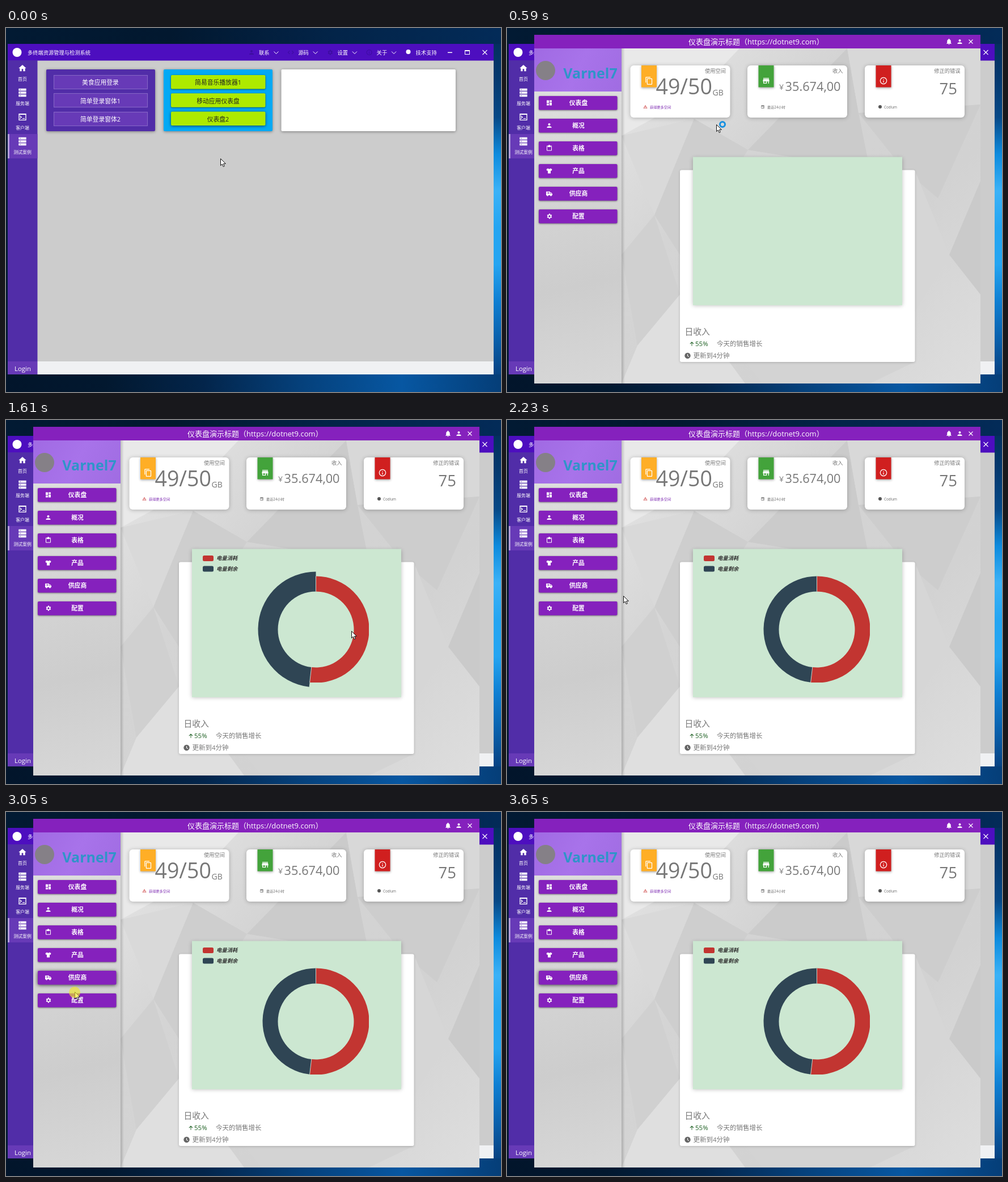
Recreate the animation shown at these times as an HTML page with a canvas. Size 873x642 px, loop 3850 ms.

```html
<!DOCTYPE html>
<html lang="zh-CN">
<head>
<meta charset="utf-8">
<title>仪表盘</title>
<style>
  html, body { margin: 0; width: 100%; height: 100%; overflow: hidden; background: #021a35; }
  canvas { display: block; }
</style>
</head>
<body>
<canvas id="stage" width="873" height="642"></canvas>
<script>
const g = document.getElementById('stage').getContext('2d');
const LOOP = 3850;
const FONT = '"Open Sans", "Noto Sans CJK SC", "Noto Sans CJK", sans-serif';

const ICONS = {
  home: 'M10 20v-6h4v6h5v-8h3L12 3 2 12h3v8z',
  server: 'M2 1h20v6H2zM2 9h20v6H2zM2 17h20v6H2zM5 3h2v2H5zM5 11h2v2H5zM5 19h2v2H5z',
  terminal: 'M2 3h20v18H2zM4 6h16v13H4zM6 8l4.5 4.5L6 17l-1.4-1.4 3.1-3.1-3.1-3.1zM12 15h6v2h-6z',
  person: 'M12 4a4 4 0 1 0 .01 0zM4 20v-2c0-5 16-5 16 0v2z',
  code: 'M9 17l-5-5 5-5-1.5-1.5L1 12l6.5 6.5zM15 17l5-5-5-5 1.5-1.5L23 12l-6.5 6.5z',
  gear: 'M19.4 13v-2l2.1-1.6-2-3.5-2.5 1-1.7-1L14.9 3h-4l-.4 2.9-1.7 1-2.5-1-2 3.5L6.4 11v2l-2.1 1.6 2 3.5 2.5-1 1.7 1 .4 2.9h4l.4-2.9 1.7-1 2.5 1 2-3.5zM12.9 8.5a3.5 3.5 0 1 0 .01 0z',
  info: 'M11 7h2v2h-2zM11 11h2v6h-2zM12 2a10 10 0 1 0 .01 0zM12 4a8 8 0 1 1-.01 0z',
  bell: 'M12 22a2 2 0 0 0 2-2h-4a2 2 0 0 0 2 2zM18 16v-5c0-3-1.6-5.6-4.5-6.3V4a1.5 1.5 0 0 0-3 0v.7C7.6 5.4 6 8 6 11v5l-2 2v1h16v-1z',
  board: 'M3 13h8V3H3zM3 21h8v-6H3zM13 21h8V11h-8zM13 3v6h8V3z',
  clipboard: 'M19 3h-4a3 3 0 0 0-6 0H5a2 2 0 0 0-2 2v14a2 2 0 0 0 2 2h14a2 2 0 0 0 2-2V5a2 2 0 0 0-2-2zM5 5h2v3h10V5h2v14H5z',
  shirt: 'M16 3l6 3-2 6-3-1v10H7V11l-3 1-2-6 6-3c1 3 7 3 8 0z',
  truck: 'M1 5h14v3h4l4 5v5h-2a3 3 0 0 1-6 0H9a3 3 0 0 1-6 0H1zM16 10v3h4l-2-3zM4 9v2h5v2l4-3-4-3v2z',
  copy: 'M16 1H4a2 2 0 0 0-2 2v14h2V3h12zM19 5H8a2 2 0 0 0-2 2v14a2 2 0 0 0 2 2h11a2 2 0 0 0 2-2V7a2 2 0 0 0-2-2zM19 21H8V7h11z',
  store: 'M20 4H4v2h16zM21 14v-2l-1-5H4l-1 5v2h1v6h10v-6h4v6h2v-6zM12 18H6v-4h6z',
  warning: 'M1 21h22L12 2zM12 6l7.5 13h-15zM11 10h2v5h-2zM11 16h2v2h-2z',
  calendar: 'M3 3h18v18H3zM5 9h14v10H5zM13 13h4v4h-4z',
  clock: 'M12 2a10 10 0 1 0 .01 0zM11 6h2v6l4 3-1 1.5-5-3.5z',
  up: 'M11 20V8l-5 5-1.5-1.5L12 4l7.5 7.5L18 13l-5-5v12z',
  arrow: 'M.5 .5V12.6L3.3 10 5.2 14.6 7.3 13.7 5.4 9.3H9.4z',
  hand: 'M3 1.5a1.3 1.3 0 0 1 2.6 0V7c2 0 6.9.5 6.9 3 0 2.5-1 4-1.5 6.5H4.5C4 14-.5 10.500 .2 9.500 1 8.500 2 9.300 3 10.500z'
};

// Pointer steps: start time, position, and what surrounds it.
const STEPS = [
  { t: 0, x: 378, y: 230 },
  { t: 200, x: 357, y: 169, shape: 'hand', fill: 9 },
  { t: 390, x: 357, y: 152, shape: 'hand', fill: 34, halo: [360, 153] },
  { t: 590, x: 369, y: 170, busy: true },
  { t: 810, x: 429, y: 263 },
  { t: 1010, x: 427, y: 335 },
  { t: 1210, x: 397, y: 362 },
  { t: 1410, x: 606, y: 375, grow: 2 },
  { t: 1610, x: 609, y: 372, grow: 8 },
  { t: 1810, x: 593, y: 370 },
  { t: 2030, x: 570, y: 365 },
  { t: 2230, x: 205, y: 310 },
  { t: 2430, x: 122, y: 293, hover: 4 },
  { t: 2630, x: 125, y: 207, hover: 2 },
  { t: 2850, x: 121, y: 232, hover: 4, halo: [121, 232] },
  { t: 3050, x: 121, y: 317, hover: 4, halo: [121, 318] },
  { t: 3250, x: 802, y: 580, hover: 4 },
  { t: 3450, hidden: true, hover: 4 }
];

function gradient(x1, y1, x2, y2, ...colors) {
  const fill = g.createLinearGradient(x1, y1, x2, y2);
  colors.forEach((c, i) => fill.addColorStop(i / (colors.length - 1), c));
  return fill;
}

function box(x, y, w, h, fill, { r = 0, shadow = 0, dark = .4 } = {}) {
  g.save();
  if (shadow) {
    g.shadowColor = `rgba(0,0,0,${dark})`;
    g.shadowBlur = shadow;
    g.shadowOffsetY = shadow > 3 ? 1 : .7;
  }
  g.fillStyle = fill;
  g.beginPath();
  g.roundRect(x, y, w, h, r);
  g.fill();
  g.restore();
}

// y is the visual middle of the line.
function text(str, x, y, size, color, align = 'left', style = '') {
  g.font = `${style} ${size}px ${FONT}`;
  g.fillStyle = color;
  g.textAlign = align;
  g.fillText(str, x, y + size * .37);
}

function line(points, color, width = 1) {
  g.strokeStyle = color;
  g.lineWidth = width;
  g.beginPath();
  points.forEach(([x, y]) => g.lineTo(x, y));
  g.stroke();
}

function poly(fill, ...points) {
  g.fillStyle = fill;
  g.beginPath();
  points.forEach(([x, y]) => g.lineTo(x, y));
  g.fill();
}

function disc(x, y, r, fill) {
  g.fillStyle = fill;
  g.beginPath();
  g.arc(x, y, r, 0, 7);
  g.fill();
}

function icon(name, x, y, size, color) {
  g.save();
  g.translate(x - size / 2, y - size / 2);
  g.scale(size / 24, size / 24);
  g.fillStyle = color;
  g.fill(new Path2D(ICONS[name]), 'evenodd');
  g.restore();
}

function cross(x, y, r) {
  line([[x - r, y - r], [x + r, y + r]], '#fff', 1.1);
  line([[x - r, y + r], [x + r, y - r]], '#fff', 1.1);
}

function desktop() {
  box(0, 0, 873, 642, gradient(0, 0, 873, 0, '#021a33', '#02182f', '#032449', '#032b58'));
  box(860, 28, 13, 583, gradient(0, 28, 0, 611,
    '#03305f', '#053a70', '#064987', '#0e8bdd', '#3bb2f7', '#25a5f1', '#25a5f1', '#0f7fd2', '#0961ad', '#074383'));
  box(0, 611, 873, 31, gradient(0, 0, 873, 0, '#02152b', '#02182f', '#03254b', '#05417c', '#0757a2', '#053e78'));
}

function mainWindow(fill = 0) {
  box(3, 28, 857, 583, '#ccc');
  box(3, 28, 857, 29.500, '#4d0ebf');
  box(3, 57, 52.500, 531, '#512da8');
  box(55, 588, 805, 23, '#f0f1f3');
  box(3, 588, 52.500, 23, '#673ab7');
  text('Login', 29.500, 601, 11.500, '#fff', 'center');

  disc(19.500, 43, 8, '#fff');
  text('多终端资源管理与检测系统', 38, 43.500, 9.250, '#fff');
  [['联系', 'person'], ['源码', 'code'], ['设置', 'gear'], ['关于', 'info']].forEach(([label, name], i) => {
    const x = 446 + i * 69.200;
    icon(name, x - 13, 43, 12, '#3d0da0');
    text(label, x, 43.500, 9.350, '#fff');
    line([[x + 26.500, 41.500], [x + 30.500, 45.500], [x + 34.500, 41.500]], '#fff');
  });
  disc(709.500, 42, 4, '#fff');
  text('技术支持', 722.500, 43.500, 9.350, '#fff');
  box(779, 42.500, 8, 1.500, '#fff');
  box(809, 39, 9, 2, '#fff');
  g.strokeStyle = '#fff';
  g.lineWidth = 1;
  g.strokeRect(809.500, 39.500, 8, 7);
  cross(844.500, 43, 4);

  box(3, 187, 52.500, 43, '#673ab7');
  box(3, 187, 3, 43, '#b39ddb');
  [['首页', 'home'], ['服务端', 'server'], ['客户端', 'terminal'], ['测试案例', 'server']].forEach(([label, name], i) => {
    icon(name, 29, 71 + i * 43, 16, '#fff');
    text(label, 29, 90 + i * 43, 7.900, '#fff', 'center');
  });

  box(71, 73, 192, 109, '#512da8', { r: 2, shadow: 5 });
  box(278, 73, 192, 109, '#03a9f4', { r: 2, shadow: 5 });
  box(485.500, 73, 307.500, 109, '#fff', { r: 2, shadow: 5 });
  ['美食应用登录', '简单登录窗体1', '简单登录窗体2'].forEach((label, i) => {
    const y = 83 + i * 32.300;
    box(84, y, 166, 25, '#673ab7');
    box(84, y, fill, 25, '#a184d4');
    g.strokeStyle = '#8564c6';
    g.strokeRect(84.500, Math.round(y) + .5, 165, 24);
    text(label, 166.500, y + 13.500, 10.800, '#fff', 'center');
  });
  ['简易音乐播放器1', '移动应用仪表盘', '仪表盘2'].forEach((label, i) => {
    const y = 83 + i * 32.300;
    box(291, y, 166.500, 24.500, '#aeea00', { r: 2, shadow: i === 2 ? 5 : 3, dark: .6 });
    text(label, 374, y + 13.500, 10.800, '#222', 'center');
  });
}

function backdrop() {
  box(48, 12, 787, 615, gradient(202, 36, 835, 627, '#e6e6e6', '#d4d4d4', '#d2d2d2', '#dedede'));
  poly('#e9e9e9', [202, 36], [410, 36], [330, 120], [202, 190]);
  poly('#cbcbcb', [600, 36], [425, 215], [640, 250], [620, 150]);
  poly('#d8d8d8', [600, 36], [835, 36], [835, 135], [620, 150]);
  poly('#cdcdcd', [620, 150], [835, 135], [760, 300], [700, 250]);
  poly('#d9d9d9', [202, 190], [330, 160], [260, 330]);
  poly('#cecece', [260, 330], [330, 160], [425, 215], [305, 400]);
  poly('#d0d0d0', [202, 400], [260, 330], [305, 470], [230, 560]);
  poly('#d6d6d6', [719, 250], [780, 400], [719, 500]);
  poly('#cacaca', [780, 400], [835, 270], [835, 470]);
  poly('#dfdfdf', [230, 560], [305, 470], [420, 627], [202, 627]);
  poly('#d3d3d3', [420, 589], [719, 589], [640, 627], [450, 627]);
}

function statCard(x, color, name, label) {
  box(x, 66, 176, 92, '#fff', { r: 6, shadow: 7, dark: .25 });
  box(x + 19.500, 66, 27, 38.500, color, { shadow: 4, dark: .35 });
  icon(name, x + 33, 93, 15, '#fff');
  text(label, x + 168.500, 75.500, 9.250, '#777', 'right');
}

function slice(from, to, outer, color) {
  const cx = 546.500, cy = 369.500;
  g.fillStyle = color;
  g.beginPath();
  g.arc(cx, cy, outer, from, to);
  g.arc(cx, cy, 67, to, from, true);
  g.fill();
}

function chart(grow = 0) {
  [['电量消耗', '#c23531'], ['电量剩余', '#2f4554']].forEach(([label, color], i) => {
    const y = 244 + i * 18.500;
    box(347, y - 5, 19, 10, color, { r: 2.500 });
    text(label, 371, y, 9.350, '#333', 'left', 'italic bold');
  });
  const top = -Math.PI / 2, split = top + Math.PI * 1.037;
  g.save();
  g.beginPath();
  g.rect(328, 228, 312, 235);
  g.clip();
  slice(top, split, 94, '#c23531');
  g.restore();
  slice(split, top + Math.PI * 2, 94 + grow, '#2f4554');
  [top, split].forEach(a => {
    const at = r => [546.500 + r * Math.cos(a), 369.500 + r * Math.sin(a)];
    line([at(67), at(94)], '#dcebdf', .8);
  });
}

function dashboard({ t, hover, grow }) {
  backdrop();
  box(202, 36, 6, 591, gradient(202, 0, 208, 0, 'rgba(0,0,0,.18)', 'rgba(0,0,0,0)'));
  box(48, 36, 154, 591, gradient(48, 112, 160, 627, '#dedede', '#d5d5d5', '#cdcdcd', '#d7d7d7'));
  box(48, 36, 154, 76, gradient(48, 36, 202, 112, '#a06ae3', '#a873ea', '#a06ce2'));
  box(48, 12, 787, 24, '#8521bd');
  text('仪表盘演示标题（https://dotnet9.com）', 320, 24, 13, '#fff');
  icon('bell', 779.500, 24, 13, '#fff');
  icon('person', 798.500, 24, 12, '#fff');
  cross(818, 24, 3.500);

  disc(68, 75, 17, '#858087');
  text('Varnel7', 147, 79.500, 25, '#2f94c9', 'center', 'bold');

  [['仪表盘', 'board'], ['概况', 'person'], ['表格', 'clipboard'],
   ['产品', 'shirt'], ['供应商', 'truck'], ['配置', 'gear']].forEach(([label, name], i) => {
    const y = 120 + i * 40, active = hover === i;
    box(56, y, 138.500, 24.500, '#8521bd', { r: 2, shadow: active ? 6 : 3, dark: active ? .7 : .5 });
    icon(name, 74.500, y + 12, 12, '#fff');
    text(label, 126, y + 11.700, 10.800, '#fff', 'center', 'bold');
  });

  statCard(217.500, '#ffae26', 'copy', '使用空间');
  text('49/50', 362, 103, 37.500, '#777', 'right');
  text('GB', 362.500, 113.500, 14, '#777');
  icon('warning', 244, 139, 7.500, '#c62828');
  text('获得更多空间', 252, 139.500, 6.200, '#7b27b0');

  statCard(424, '#43a33b', 'store', '收入');
  text('￥', 478, 105, 12, '#777');
  text('35.674,00', 588.500, 102.500, 21.700, '#777', 'right');
  icon('calendar', 451, 139, 7, '#666');
  text('最近24小时', 459, 139.500, 6.200, '#666');

  statCard(631, '#d01f1f', 'info', '修正的错误');
  text('75', 794, 106.500, 27.500, '#777', 'right');
  disc(658, 139, 3, '#555');
  text('Codlum', 665, 139.500, 6.300, '#666');

  box(305, 250.500, 414.500, 338.500, '#fff', { r: 3, shadow: 4, dark: .2 });
  box(328, 227.500, 369, 261.500, '#cce7d1', { shadow: 7, dark: .25 });
  text('日收入', 313.500, 536, 14.800, '#777');
  icon('up', 326, 557, 11, '#1b5e20');
  text('55%', 332, 556.500, 11.500, '#1b5e20');
  text('今天的销售增长', 370, 556.500, 11.500, '#777');
  icon('clock', 318.500, 578, 12.500, '#666');
  text('更新到4分钟', 328.500, 578, 11.500, '#777');
  if (t >= 810) chart(grow);
}

function pointer({ x, y, shape = 'arrow', busy, halo, hidden }) {
  if (hidden) return;
  g.save();
  g.translate(x, y);
  const path = new Path2D(ICONS[shape]);
  g.fillStyle = '#fff';
  g.fill(path);
  g.strokeStyle = '#111';
  g.lineWidth = 1;
  g.stroke(path);
  g.restore();
  if (busy) {
    g.strokeStyle = '#1690e0';
    g.lineWidth = 3;
    g.beginPath();
    g.arc(380, 170, 4.500, 0, 7);
    g.stroke();
  }
  if (halo) disc(...halo, 10, 'rgba(240,230,40,.65)');
}

let shown;
function render() {
  const now = performance.now() % LOOP;
  const step = STEPS.findLast(s => s.t <= now);
  if (step !== shown) {
    shown = step;
    desktop();
    mainWindow(step.fill);
    if (step.t >= 590) dashboard(step);
    pointer(step);
  }
  requestAnimationFrame(render);
}
render();
</script>
</body>
</html>
```
